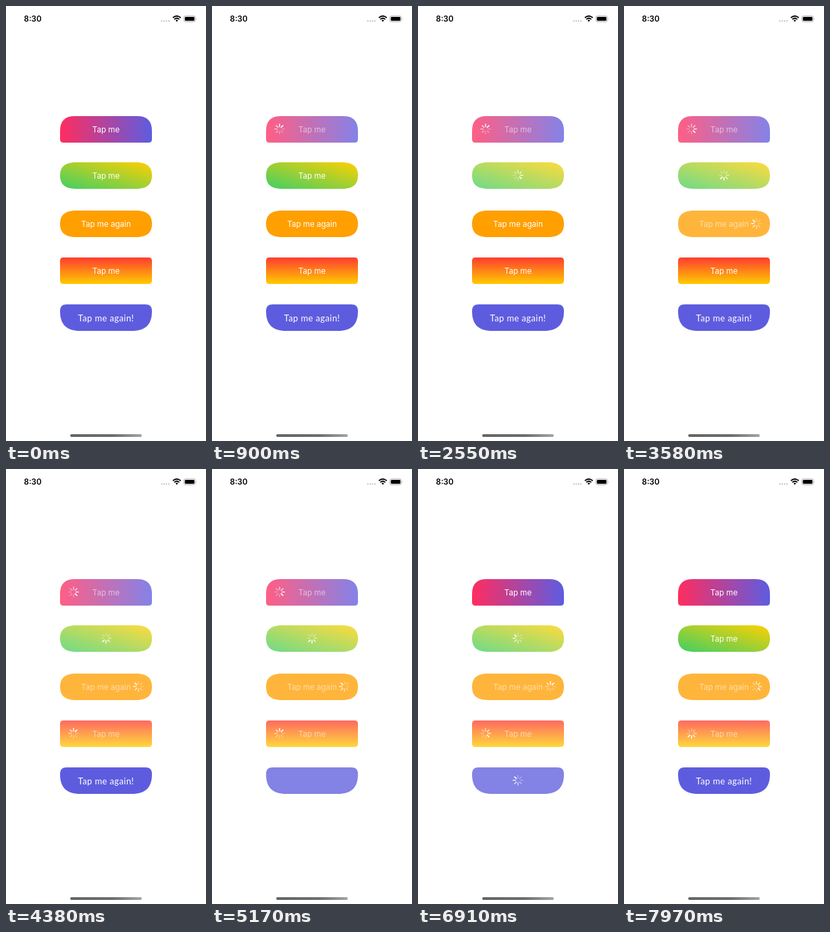
Recreate the animation shown at these times as an HTML page. Size 296 by 640 pixels, loop 8 s.

```html
<!DOCTYPE html>
<html lang="en">
<head>
<meta charset="utf-8">
<title>Loading buttons</title>
<style>
  html, body { margin: 0; width: 296px; height: 640px; overflow: hidden; background: #fff; }
  body { position: relative; font-family: Inter, Roboto, sans-serif; }
  .status { position: absolute; left: 0; top: 0; }
  .clock { position: absolute; left: 26.5px; top: 11px; font-size: 11.6px; line-height: 16px; font-weight: 600; color: #000; }
  .home { position: absolute; left: 95px; top: 630px; width: 106px; height: 4px; border-radius: 2px;
    background: linear-gradient(90deg, #646464, #6c6c6c 60%, #a4a4a4); }
  .button { position: absolute; left: 80px; width: 136px; height: 39px; }
  .fill { position: absolute; inset: 0; }
  .title { position: absolute; inset: 0; text-align: center; line-height: 40px; font-size: 11.6px; color: #fff; white-space: nowrap; }
  .airy { font-family: Lato, sans-serif; font-size: 13px; letter-spacing: .4px; }
  .spinner { position: absolute; top: 10.2px; width: 18px; height: 18px; }
</style>
</head>
<body>
<div class="clock">8:30</div>
<svg class="status" width="296" height="40">
  <g fill="#bdbdbd">
    <circle cx="230.6" cy="22" r="1.1"/><circle cx="234.1" cy="22" r="1.1"/>
    <circle cx="237.6" cy="22" r="1.1"/><circle cx="241.1" cy="22" r="1.1"/>
  </g>
  <g fill="none" stroke="#000" stroke-width="1.8">
    <path d="M247 17.3Q252.8 12.2 258.6 17.3M249.1 19.6Q252.8 16.3 256.5 19.6"/>
    <path d="M250.9 21.1Q252.8 19.4 254.7 21.1L252.8 23.3Z" fill="#000" stroke="none"/>
  </g>
  <rect x="263.3" y="14.6" width="17" height="8.6" rx="2.5" fill="none" stroke="#a6a6a6" stroke-width=".9"/>
  <rect x="264.7" y="16" width="14.2" height="5.8" rx="1.4"/>
  <path d="M281.3 17.4q1.4 1.5 0 3z" fill="#a6a6a6"/>
</svg>
<div class="home"></div>
<script>
const LOOP = 8000, SPOKES = 8, STEP = 100, W = 136, H = 39;

// on / off: start and end of loading; phase shifts the spinner; keep: title opacity while loading
// top / bottom: [width, height] of the corner curves
const buttons = [
  { y: 162, text: 'Tap me', fill: 'linear-gradient(90deg, #ff2d5f, #5e5ce0)', top: [22, 22], bottom: [5, 5],
    spin: 20, keep: .55, on: 500, off: 6450, phase: 0 },
  { y: 230, text: 'Tap me', fill: 'linear-gradient(to top right, #40cf65, #ffd000)', top: [24, 19.5], bottom: [24, 19.5],
    spin: 68, keep: 0, on: 1770, off: 7350, phase: 600, shakes: true },
  { y: 301, text: 'Tap me again', fill: '#ff9f00', top: [24, 19.5], bottom: [24, 19.5],
    spin: 116, keep: .55, on: 2950, off: LOOP, phase: 400 },
  { y: 370, text: 'Tap me', fill: 'linear-gradient(#ff3b30, #ffcc00)', top: [5, 5], bottom: [5, 5],
    spin: 20, keep: .55, on: 3700, off: LOOP, phase: 200 },
  { y: 439, text: 'Tap me again!', fill: '#5e5cde', top: [10, 10], bottom: [30, 29], airy: true,
    spin: 68, keep: 0, on: 4860, off: 7500, phase: 600 }
];

const clamp = x => Math.min(1, Math.max(0, x));
const mix = (a, b, k) => a + (b - a) * k;

// Outline with continuous corners, fuller than circular arcs
function outline([tx, ty], [bx, by]) {
  const c = .32;
  return `M0 ${ty}C0 ${ty * c} ${tx * c} 0 ${tx} 0H${W - tx}C${W - tx * c} 0 ${W} ${ty * c} ${W} ${ty}` +
    `V${H - by}C${W} ${H - by * c} ${W - bx * c} ${H} ${W - bx} ${H}H${bx}C${bx * c} ${H} 0 ${H - by * c} 0 ${H - by}Z`;
}

function build(b) {
  const spokes = Array.from({ length: SPOKES }, (_, i) =>
    `<path d="M0 -3.6V-7.1" transform="rotate(${i * 360 / SPOKES})"/>`).join('');
  const box = document.createElement('div');
  box.className = 'button';
  box.style.top = b.y + 'px';
  box.innerHTML = `<div class="fill" style="background:${b.fill};clip-path:path('${outline(b.top, b.bottom)}')"></div>
    <div class="title${b.airy ? ' airy' : ''}">${b.text}</div>
    <svg class="spinner" style="left:${b.spin - 9}px" viewBox="-9 -9 18 18"
      stroke="#fff" stroke-width="1.7" stroke-linecap="round">${spokes}</svg>`;
  document.body.append(box);
  [b.back, b.title, b.spinner] = box.children;
  b.box = box;
}

// Decaying side-to-side shake through evenly spaced key offsets
const SHAKE = [0, -15, 15, -15, 15, -8, 8, -4, 4, 0];
function shakeOffset(t) {
  const p = clamp(t / 450) * (SHAKE.length - 1), i = Math.min(Math.floor(p), SHAKE.length - 2);
  return mix(SHAKE[i], SHAKE[i + 1], p - i);
}

function drawButton(b, t) {
  const load = clamp((t - b.on) / 250) - clamp((t - b.off) / 200);
  b.back.style.opacity = mix(1, .765, load);
  b.title.style.opacity = mix(1, b.keep, load);
  b.spinner.style.visibility = t >= b.on + 400 && t < b.off ? 'visible' : 'hidden';
  const head = Math.floor((t - b.phase + LOOP) / STEP);
  [...b.spinner.children].forEach((spoke, i) => {
    const age = (head - i + SPOKES) % SPOKES;
    spoke.style.opacity = Math.max(.28, 1 - age * .15);
  });
  if (b.shakes) b.box.style.transform = `translateX(${shakeOffset(t - b.on)}px)`;
}

buttons.forEach(build);
const start = performance.now();
function frame() {
  const t = (performance.now() - start) % LOOP;
  buttons.forEach(b => drawButton(b, t));
  requestAnimationFrame(frame);
}
frame();
</script>
</body>
</html>
```
